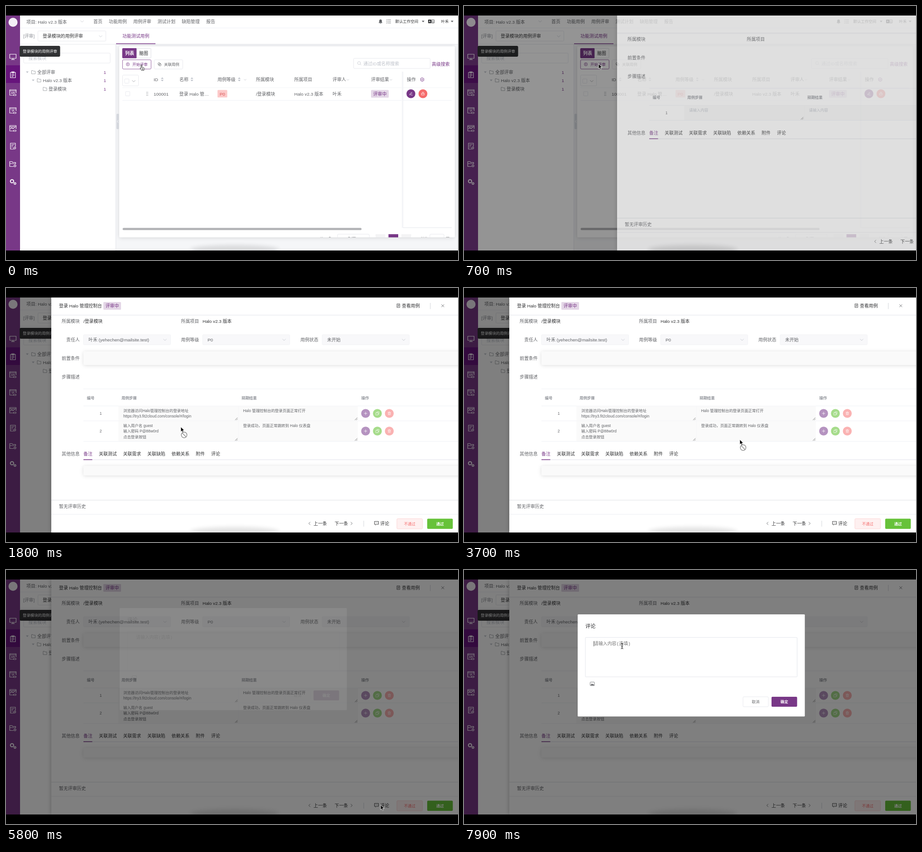
An HTML page that plays this animation: 998 px wide and 561 px high, repeating every 8 s.

```html
<!DOCTYPE html>
<html lang="zh-CN">
<head>
<meta charset="utf-8">
<title>用例评审</title>
<style>
html, body { margin: 0; width: 100%; height: 100%; overflow: hidden; background: #000; }
svg { display: block; width: 100vw; height: 100vh; }
text { font-family: "Liberation Sans", "Noto Sans CJK SC", "Noto Sans CJK", sans-serif; white-space: pre; }
.mono { font-family: "Liberation Mono", "Noto Sans CJK SC", "Noto Sans CJK", monospace; }
.soft { filter: drop-shadow(0 1px 4px rgba(0, 0, 0, .13)); }
.panel { filter: drop-shadow(0 0 5px rgba(0, 0, 0, .25)); }
.dock { filter: blur(5px); }
</style>
</head>
<body>
<svg id="stage" viewBox="0 0 998 561" preserveAspectRatio="none"></svg>
<script>
const MAIN = '#783887', DARK = '#303133', TEXT = '#606266', MUTE = '#909399', HINT = '#bfc3cb', EDGE = '#e2e4ea';
const BODY = 9.9, SMALL = 8.45;

// x is the left edge and y the vertical centre of the text.
const txt = (x, y, s, fill = TEXT, size = BODY, weight = 400, extra = '') =>
  `<text x="${x}" y="${(y + size * .37).toFixed(2)}" font-size="${size}" font-weight="${weight}" fill="${fill}" ${extra}>${s}</text>`;
const small = (x, y, s, fill = TEXT, weight = 400) => txt(x, y, s, fill, SMALL, weight);
const mid = (x, y, s, fill, size = SMALL, weight = 400) => txt(x, y, s, fill, size, weight, 'text-anchor="middle"');
const box = (x, y, w, h, fill, stroke = 'none', r = 0, extra = '') =>
  `<rect x="${x}" y="${y}" width="${w}" height="${h}" rx="${r}" fill="${fill}" stroke="${stroke}" stroke-width=".8" ${extra}/>`;
const line = (d, stroke = TEXT, w = .9, fill = 'none') =>
  `<path d="${d}" stroke="${stroke}" stroke-width="${w}" fill="${fill}" stroke-linecap="round" stroke-linejoin="round"/>`;
const dot = (x, y, r, fill, stroke = 'none', w = .8) =>
  `<circle cx="${x}" cy="${y}" r="${r}" fill="${fill}" stroke="${stroke}" stroke-width="${w}"/>`;
const hr = (x, y, w, c = '#ebeef5', h = .8) => box(x, y, w, h, c);
const group = (id, s, extra = '') => `<g id="${id}" ${extra}>${s}</g>`;
const at = (x, y, s) => `<g transform="translate(${x} ${y})">${s}</g>`;
const down = (x, y, c = HINT, r = 3.2) => line(`M${x - r} ${y - r / 2}l${r} ${r}l${r} ${-r}`, c, .8);
const caret = (x, y, c = TEXT) => `<path d="M${x - 3} ${y - 1.5}h6l-3 3.4z" fill="${c}"/>`;
const sort = (x, y) => `<path d="M${x - 3} ${y - 1}h6l-3 -3.4zM${x - 3} ${y + 1}h6l-3 3.4z" fill="${HINT}"/>`;
const folder = (x, y) => line(`M${x - 4} ${y + 3.5}v-7h3l1 1.4h4v5.6z`, MUTE, .8);
const doc = (x, y, c = TEXT) => line(`M${x - 3} ${y - 4}h6v8h-6zM${x - 1.4} ${y - 1.8}h2.8M${x - 1.4} ${y}h2.8M${x - 1.4} ${y + 1.8}h1.6`, c, .8);
const bin = c => line('M-3 -2h6M-1 -2v-1.3h2v1.3M-2.3 -2v5h4.6v-5M-.7 0v1.5M.7 0v1.5', c, .7);
const pill = (x, y, s) => box(x, y, 39, 17, '#e4d7e7', 'none', 1.5) + mid(x + 19.5, y + 8.5, s, MAIN, BODY);
const grip = (x, y) => line(`M${x - 2.5} ${y + 2.5}l5 -5M${x + .5} ${y + 2.5}l2 -2`, '#555', .7);

function sidebar() {
  const w = '#fff', ic = d => line(d, w, 1.2), frame = 'M1 6h-8v-12h14v7M-7 -3.5h14M3 4l-1.5 1.5l1.5 1.5M5.5 4l1.5 1.5l-1.5 1.5';
  const label = s => ic(frame) + mid(0, .6, s, w, 5.5, 700);
  const icons = [
    ic('M-7 -5.5h14v9h-14zM-3.5 6.3h7M0 3.5v2.5'),
    ic('M-5.5 -5h11v12h-11zM-2.5 -6.5h5v2.6h-5zM-2.5 -1h5M-2.5 1.7h5M-2.5 4.4h3'),
    label('API'), label('UI'),
    ic(frame) + ic('M-5 1l2.5 -2.5l2.5 2.5l4 -3'),
    ic('M2 6.5h-7.5v-13h11v7M-3 -3.5h6M-3 -1h3M-3 2h2') + dot(4, 4, 2.2, 'none', w, 1.2),
    ic('M1 5.5h-8v-11h5l1.5 2h6.5v3M-7 -1h13') + dot(4.5, 4, 2.2, 'none', w, 1.2),
    dot(-2, -1.5, 3.6, 'none', w, 2) + dot(4.5, 3.5, 2, 'none', w, 1.6)
  ];
  return box(0, 21, 31, 519, MAIN) + box(0, 131, 31, 39, '#67147c') + dot(15.5, 36, 10, '#f4eef6') +
    icons.map((s, i) => at(15.3, 112 + i * 39.5, s)).join('');
}

function page() {
  const nav = [[193, '首页'], [227, '功能用例'], [281, '用例评审'], [334.5, '测试计划'], [388, '缺陷管理'], [442, '报告']];
  const heads = [[326, 'ID'], [383, '名称'], [467, '用例等级'], [552, '所属模块'], [636.5, '所属项目'], [721, '评审人'], [806, '评审结果'], [885, '操作']];
  const lang = box(932, 30, 7, 8, DARK, 'none', 1) + mid(935.5, 34, 'A', '#fff', 6, 700) + box(939.4, 30.4, 6.4, 7.2, '#fff', DARK, 1) + mid(942.6, 34, '文', DARK, 5);
  const top = box(31, 21, 967, 519, '#fff') +
    txt(45, 35, '项目: Halo v2.3 版本') + down(168, 34) + nav.map(([x, s]) => txt(x, 34, s)).join('') +
    line('M823.5 37h7l-1 -1.5v-3a2.5 2.5 0 0 0 -5 0v3zM826 38.6h2', TEXT, .8, TEXT) +
    line('M843.5 30.5h6M843.5 34h6M843.5 37.5h6M840 30.5l.8 .8l1 -1.6M840 34l.8 .8l1 -1.6M840 37.5l.8 .8l1 -1.6', TEXT, .8) +
    small(859.5, 34, '默认工作空间', DARK) + caret(921, 34) + lang + small(960.5, 34, '叶禾', DARK) + caret(985, 34) +
    hr(31, 48, 967) +
    txt(38, 66, '[评审]', MUTE) + box(70.5, 55, 150, 22.5, '#fff', EDGE, 2) + txt(81, 66, '登录模块的用例评审', DARK) + down(209, 67) +
    txt(257, 66, '功能测试用例', MAIN) + hr(31, 84, 967, '#e2e3e8');
  const tree = box(39, 104, 191, 22, '#fff', EDGE, 2) + txt(49.5, 115, '搜索模块', HINT) +
    caret(47, 146, HINT) + folder(60.5, 146) + txt(69, 146, '全部评审') +
    caret(60, 164, HINT) + folder(73, 164) + txt(81.5, 164, 'Halo v2.3 版本') +
    folder(86, 183) + txt(94, 183, '登录模块') +
    [146, 164, 183].map(y => txt(215.5, y, '1', MAIN)).join('');
  const card = box(243, 85, 755, 455, '#f5f6f8') + box(250, 89, 741, 422, '#fff', 'none', 2, 'class="soft"') + hr(243, 82.6, 87, MAIN, 1.5) +
    box(242, 85, .8, 455, '#dcdfe6') + box(244, 238, 5.5, 34, '#d4d7dd', 'none', 2) + line('M247.6 252.5l-1.8 2.5l1.8 2.5', '#fff') +
    box(257, 93.5, 31.5, 21.5, MAIN, MAIN, 1.5) + txt(263, 104.3, '列表', '#fff', BODY, 700) +
    box(288.5, 93.5, 31.5, 21.5, '#fff', '#d4d6dc', 1.5) + txt(294, 104.3, '脑图', DARK) +
    box(257.3, 118.8, 63, 20.4, '#fff', MAIN, 2) + dot(269, 128.7, 3.5, 'none', MAIN) + line('M268 127.2v3l2.3 -1.5z', MAIN, .6) + small(279, 129, '开始评审', MAIN, 500) +
    box(327.3, 118.8, 63, 20.4, '#fff', EDGE, 2) + dot(338, 127.7, 2.6, 'none', TEXT) + dot(340, 129.7, 2.6, 'none', TEXT) + small(349, 129, '关联用例', TEXT, 500) +
    box(767.5, 115.5, 169, 22.5, '#fff', EDGE, 2) + dot(779.5, 126, 3.2, 'none', HINT) + line('M782 128.5l1.8 1.8', HINT) + txt(789, 127, '通过ID或名称搜索', HINT) +
    txt(940, 128, '高级搜索', MAIN, BODY, 500);
  const table = box(257.5, 152.5, 35, 24, '#fff', EDGE, 2) + box(262, 161, 9.5, 9.5, '#fff', EDGE, 1) + down(282, 166, MUTE) +
    heads.map(([x, s]) => txt(x, 162, s, TEXT, BODY, 500)).join('') +
    sort(345, 162) + sort(410.5, 162) + sort(515, 162) + [528, 755, 850].map(x => down(x, 163, HINT, 2.2)).join('') +
    dot(919, 162.5, 1.5, 'none', MAIN) + line('M919 158.3l3.6 2.1v4.2l-3.6 2.1l-3.6 -2.1v-4.2z', MAIN, .9) +
    hr(257, 180, 727, '#f1f3f7') + hr(257, 208, 727) + box(264, 189, 9.5, 9.5, '#fff', EDGE, 1) +
    [310.5, 313].map(x => [190.5, 194, 197.5].map(y => dot(x, y, .8, MUTE)).join('')).join('') +
    txt(326, 194, '100001') + txt(382.5, 194, '登录 Halo 管…') +
    box(467, 185.5, 21.5, 16.5, '#fcc9c9', 'none', 1.5) + mid(477.8, 194, 'P0', '#d95757', BODY) +
    txt(552, 194, '/登录模块') + txt(636.5, 194, 'Halo v2.3 版本') + txt(721, 194, '叶禾') + pill(806, 185.5, '评审中') +
    box(876, 145, 1, 345, '#eceef2') + box(873.5, 145, 2.5, 345, '#f7f8fa') + hr(877, 489, 107, '#e8eaee', 1.2) +
    dot(894, 193.7, 9.8, MAIN) + line('M891.5 196l.4 -1.8l3.4 -3.4l1.4 1.4l-3.4 3.4zM894.5 196.8h3', '#fff', .8) +
    dot(920.6, 193.7, 9.8, '#f56c6c') + line('M917.8 193h5.6v3.6h-5.6zM919 193v-1.2a1.6 1.6 0 0 1 3.2 0v1.2', '#fff', .8) +
    box(257.5, 490, 527.5, 5, '#b4b5b8', 'none', 2.5);
  const pager = small(693, 514, '共 1 条') + box(732, 504, 70, 20, '#fff', EDGE, 2) + small(744, 514, '10条/页') +
    box(816, 504, 21.5, 20, '#f4f4f5') + box(844.5, 504, 21.5, 20, MAIN) + box(873, 504, 21.5, 20, '#f4f4f5') +
    mid(855, 514, '1', '#fff') + small(915, 514, '前往') + box(936, 504, 31, 20, '#fff', EDGE, 2) + mid(951, 514, '1', TEXT) + small(971, 514, '页');
  const tip = box(30, 88, 89.5, 24, DARK, 'none', 3) + small(37, 100, '登录模块的用例评审', '#fff', 500);
  return top + tree + card + table + `<g clip-path="url(#cardClip)">${pager}</g>` + sidebar() + tip;
}

function drawer() {
  const select = (x, s) => box(x, 103, 192.5, 22.5, '#f8f8fa', '#f0f1f4', 2) + txt(x + 11, 114.3, s) + down(x + 180, 114.5);
  const editor = (y, h) => box(171, y, 840, h, '#fafafa', 'none', 2, 'class="soft"');
  const ops = y => at(794, y, dot(0, 0, 9.8, '#b593c0') + line('M-3 0h6M0 -3v6', '#fff', .8)) +
    at(820, y, dot(0, 0, 9.8, '#a6dc8b') + line('M-3 -1.5h4.5v5h-4.5zM-1 -1.5v-2h4.5v5h-2', '#fff', .7)) +
    at(846.3, y, dot(0, 0, 9.8, '#fab2b2') + bin('#fff'));
  const row = (n, y, h, cy) => box(248, y, 529, h, '#fafafa') + box(513, y, .6, h, '#f3f4f6') + mid(209, cy, n, TEXT) +
    grip(508.5, y + h - 4) + grip(773, y + h - 4) + hr(171, y + h, 827, '#eceef3') + ops(cy);
  const tabs = [[205, '关联测试'], [258.5, '关联需求'], [312, '关联缺陷'], [365.5, '依赖关系'], [419, '附件'], [453, '评论']];
  const full = s => `<g class="full">${s}</g>`, blank = s => `<g class="blank">${s}</g>`;
  return box(100, 21, 900, 519, '#fff', 'none', 0, 'class="panel"') +
    full(txt(117, 39.5, '登录 Halo 管理控制台', DARK) + pill(215, 31, '评审中')) +
    doc(866.5, 39, DARK) + txt(874, 39.5, '查看用例', DARK) + box(936.5, 33, .8, 13.5, '#c8cad0') + line('M961.7 36.5l5.4 5.4m0 -5.4l-5.4 5.4', TEXT) +
    hr(100, 59, 898, '#e6e8ee') + box(100, 60, 898, 1.5, '#f7f8fa') +
    txt(123, 73.7, '所属模块') + txt(386.5, 73.7, '所属项目') +
    full(txt(171, 73.7, '/登录模块', DARK) + txt(434, 73.7, 'Halo v2.3 版本', DARK) +
      txt(133, 114.3, '责任人') + select(171, '叶禾 (yehechen@mailsite.test)') +
      txt(386.5, 114.3, '用例等级') + select(434, 'P0') + txt(650, 114.3, '用例状态') + select(698, '未开始')) +
    group('steps', txt(123, 155.5, '前置条件') + full(editor(140, 30)) + txt(123, 196.5, '步骤描述') + hr(171, 222.5, 827, '#eceef3') +
      [[178.5, '编号'], [255, '用例步骤'], [520, '预期结果'], [784.5, '操作']].map(([x, s]) => small(x, 242.5, s, MUTE, 700)).join('') +
      hr(171, 260, 827, '#eceef3') + row('1', 260.5, 32.5, 277) +
      blank(small(259, 270.5, '请输入内容', HINT) + small(523.5, 270.5, '请输入内容', HINT)) +
      full(row('2', 293.5, 45, 316) +
        small(259, 270.5, '浏览器访问Halo管理控制台的登录地址') + small(259, 283, 'https://try3.fit2cloud.com/console/#/login') +
        small(259, 303.5, '输入用户名 guest') + small(259, 316, '输入密码 P@88w0rd') + small(259, 328.7, '点击登录按钮') +
        small(523.5, 270.5, 'Halo 管理控制台的登录页面正常打开') + small(523.5, 303.5, '登录成功，页面正常跳转到 Halo 仪表盘'))) +
    group('tabs', txt(123, 366, '其他信息') + txt(171, 366, '备注', MAIN, BODY, 500) +
      tabs.map(([x, s]) => txt(x, 366, s, DARK, BODY, 500)).join('') +
      hr(171, 378.8, 827, '#dfe2e9', 1) + hr(171, 378.5, 19.5, MAIN, 1.5) + full(editor(393, 21))) +
    hr(100, 468, 898, '#dfe1e6', 1) + txt(117, 482.5, '暂无评审历史') + hr(100, 499.5, 898, '#e6e8ee') +
    line('M671.5 517l-3 3l3 3M761.5 517l3 3l-3 3', TEXT) + txt(679, 520.3, '上一条', DARK) + txt(725.5, 520.3, '下一条', DARK) +
    box(789.5, 514, .8, 13, '#c8cad0') + line('M814 515.5h8.5v6.5h-5l-1.5 1.6v-1.6h-2zM816 518.7h.2M818.2 518.7h.2M820.4 518.7h.2', DARK) + txt(826.3, 520.3, '评论', DARK) +
    box(863, 509.5, 56.5, 22.5, '#fef0f0', '#fbd0d0', 2) + mid(891.3, 521, '不通过', '#f56c6c', SMALL, 500) +
    box(930, 509.5, 56.5, 22.5, '#67c23a', 'none', 2) + mid(958.3, 521, '通过', '#fff', SMALL, 700);
}

function dialog() {
  return box(251, 98, 501.5, 225.5, '#fff', 'none', 1.5) + txt(268, 123.5, '评论', DARK, 11.3, 500) +
    box(268, 149, 467.5, 87, '#fff', '#dcdfe6', 1) + txt(287, 162.5, '请输入内容(选填)', '#757575', BODY, 400, 'class="mono"') +
    group('caret', box(286.4, 157, .9, 11.5, '#222')) +
    box(278.5, 247.5, 9.5, 8, '#fff', TEXT, 1) + line('M280 254l2.2 -3l1.8 2l1.2 -1.2l1.6 2.2z', TEXT, .6, TEXT) +
    box(616, 280, 56, 22, '#fff', EDGE, 2) + mid(644, 291, '取消', TEXT, SMALL, 500) +
    box(679, 280, 56.5, 22, MAIN, 'none', 2) + mid(707.3, 291, '确定', '#fff', SMALL, 700);
}

const pointer = group('arrow', line('M0 0v10.6l2.5 -2.2l1.8 4.1l1.9 -.8l-1.8 -4h3.3z', '#fff', .8, '#000')) +
  group('ban', dot(7.3, 17.5, 6.2, '#fff', '#888', 1.4) + line('M3.4 13.6l7.8 7.8', '#888', 1.4)) +
  group('hand', line('M1 .8a1 1 0 0 1 2 0v4.6l4.4 1c1 .3 1.2 1 1 2l-.8 3.8h-5.4l-3 -4.2c-.5 -1 .7 -1.6 1.8 -.4zM3.8 8v2.5M5.6 8v2.5', '#222', .9, '#fff')) +
  group('beam', line('M-2.2 -6q2.2 0 2.2 1.5q0 -1.5 2.2 -1.5M0 -4.5v9M-2.2 6q2.2 0 2.2 -1.5q0 1.5 2.2 1.5M-1.2 1.5h2.4', '#111', 1));

document.getElementById('stage').innerHTML =
  `<defs><clipPath id="screen">${box(0, 21, 998, 519, '#000')}</clipPath><clipPath id="cardClip">${box(250, 89, 741, 422, '#000')}</clipPath></defs>` +
  box(0, 0, 998, 561, '#000') +
  `<g clip-path="url(#screen)">` + page() + group('shade', box(0, 21, 998, 519, '#000')) +
  group('drawer', drawer()) + group('veil', box(100, 21, 898, 519, '#000', 'none', 0, 'opacity=".5"')) +
  group('dialog', dialog()) + '<ellipse class="dock" cx="505" cy="538" rx="98" ry="10" opacity=".11"/>' + group('cursor', pointer) + '</g>';

// [time, x, y]
const PATH = [[0, 297, 130], [400, 297, 130], [500, 297, 128], [800, 297, 128], [1300, 269, 254], [1600, 345, 329], [1800, 386, 307],
  [1900, 389, 290], [2200, 334, 261], [2700, 334, 261], [3000, 430, 292], [3400, 626, 334], [3600, 573, 336], [3700, 609, 335],
  [5600, 609, 335], [5700, 826, 520], [5800, 827, 519], [6000, 570, 360], [6200, 367, 269], [6700, 367, 269],
  [6800, 371, 203], [7000, 372, 222], [7300, 372, 222], [7600, 349, 168]];
// [time, drawer x, drawer opacity, shade]
const SLIDE = [[400, 998, 0, 0], [500, 900, .1, .1], [600, 640, .4, .28], [700, 338, .7, .42], [800, 155, .92, .5], [900, 100, 1, .5]];
// [time, dialog offset, dialog opacity]
const POP = [[5700, -20, 0], [5800, -14, .08], [5900, -5, .65], [6000, -1, .95], [6100, 0, 1]];

function sample(keys, t) {
  const i = keys.findIndex(k => k[0] > t);
  if (i < 0) return keys[keys.length - 1].slice(1);
  if (!i) return keys[0].slice(1);
  const a = keys[i - 1], b = keys[i], p = (t - a[0]) / (b[0] - a[0]);
  return a.slice(1).map((v, j) => v + (b[j + 1] - v) * p);
}

const el = id => document.getElementById(id);
const show = (node, on) => node.setAttribute('visibility', on ? 'visible' : 'hidden');
const move = (id, x, y) => el(id).setAttribute('transform', `translate(${x} ${y})`);
const fade = (id, v) => el(id).setAttribute('opacity', v);
const fulls = document.querySelectorAll('.full'), blanks = document.querySelectorAll('.blank');

function draw(t) {
  const [dx, dOpacity, shade] = sample(SLIDE, t), [py, pOpacity] = sample(POP, t);
  const loaded = t >= 1000;
  move('drawer', dx - 100, 0);
  fade('drawer', dOpacity);
  fade('shade', shade);
  move('steps', 0, loaded ? 0 : -41);
  move('tabs', 0, loaded ? 0 : -86);
  fulls.forEach(n => show(n, loaded));
  blanks.forEach(n => show(n, !loaded));
  fade('veil', t >= 5800 ? 1 : 0);
  move('dialog', 0, py);
  fade('dialog', pOpacity);
  show(el('caret'), (t >= 7200 && t < 7500) || t >= 7900);

  const hand = t < 500 || t === 5700, beam = t >= 6800;
  move('cursor', ...sample(PATH, t));
  show(el('hand'), hand);
  show(el('beam'), beam);
  show(el('arrow'), !hand && !beam);
  show(el('ban'), t >= 1300 && t < 5700);
}

// The picture advances in steps of 100 ms.
const start = performance.now();
function tick() {
  draw(Math.floor((performance.now() - start) % 8000 / 100) * 100);
  requestAnimationFrame(tick);
}
tick();
</script>
</body>
</html>
```
